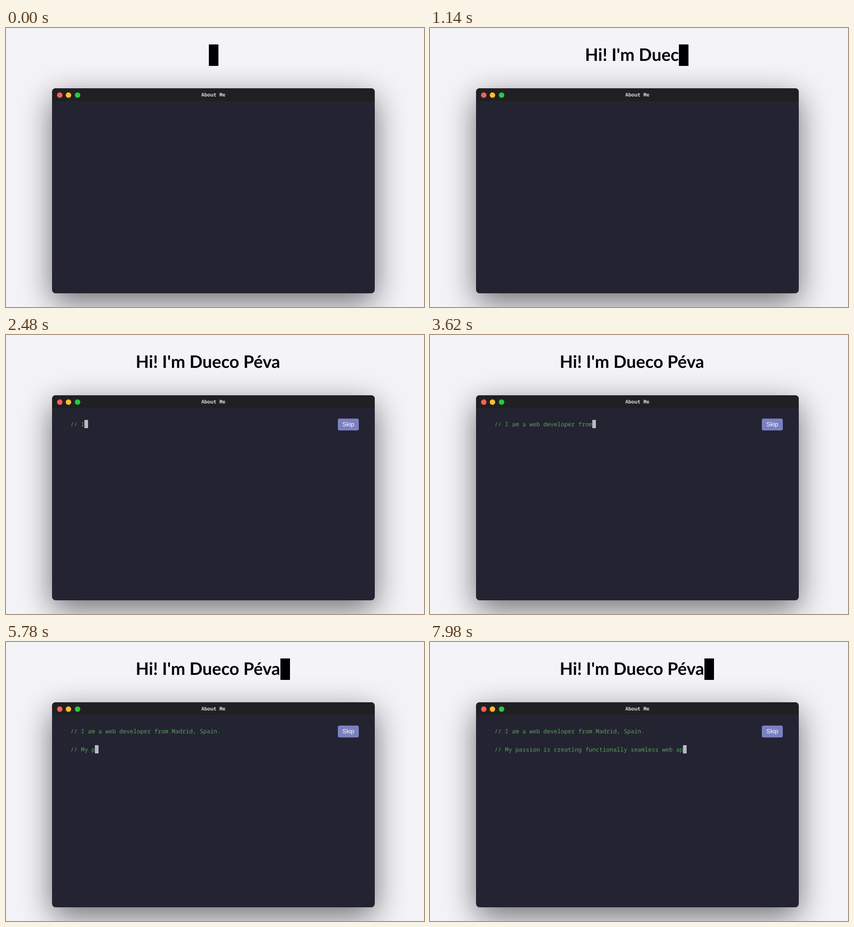
Write an HTML page that moves like this. It is 917 by 611 pixels and loops after 8000 ms.

```html
<!DOCTYPE html>
<html lang="en">
<head>
<meta charset="utf-8">
<title>About Me</title>
<style>
  html, body { margin: 0; width: 100%; height: 100%; overflow: hidden; background: #f4f3f8; }
  body { position: relative; text-rendering: geometricPrecision; }
  .title {
    position: absolute; left: 0; top: 36px; width: 910.5px; height: 47px;
    display: flex; justify-content: center; align-items: flex-start;
    font: 700 37.7px/45px Lato, sans-serif; color: #050507; white-space: pre;
  }
  #name { margin-left: -3px; }
  #name:empty { margin: 0; }
  #nameCaret { width: 21.5px; height: 47px; background: #000; flex: none; }
  .window {
    position: absolute; left: 101px; top: 132px; width: 708px; height: 449px;
    border-radius: 8px; background: #242332;
    box-shadow: 0 20px 68px rgba(0, 0, 0, .55);
  }
  .bar {
    height: 28px; border-radius: 8px 8px 0 0; background: #202023; color: #d6d5da;
    font: 700 11px/29px "Noto Sans Mono", monospace; text-align: center;
  }
  .dot { position: absolute; top: 8.7px; width: 12px; height: 12px; border-radius: 50%; }
  .code {
    position: absolute; left: 40.5px; top: 53px; white-space: pre; color: #5aa05c;
    font: 500 12.78px/20px "Noto Sans Mono", monospace;
  }
  #codeCaret {
    display: inline-block; width: 8px; height: 18px; margin-top: 1px;
    vertical-align: top; background: #bbb9c0;
  }
  #skip {
    position: absolute; left: 627px; top: 51px; width: 46px; height: 26px;
    border-radius: 4px; background: #7b80c0; color: #fff;
    font: 13.33px/25px "Liberation Sans", Arial, sans-serif; text-align: center;
  }
</style>
</head>
<body>
<div class="title"><span id="name"></span><span id="nameCaret"></span></div>
<div class="window">
  <div class="bar">About Me</div>
  <i class="dot" style="left:10.5px;background:#ff5f56"></i>
  <i class="dot" style="left:30.3px;background:#ffbd2e"></i>
  <i class="dot" style="left:50px;background:#27c93f"></i>
  <div class="code"><span id="code"></span><span id="codeCaret"></span></div>
  <div id="skip">Skip</div>
</div>
<script>
const LOOP = 8000, BLINK = 500;
const NAME = "Hi! I'm Dueco Péva";
const CODE = "// I am a web developer from Madrid, Spain.\n\n" +
  "// My passion is creating functionally seamless web ap";

// [time in ms, characters typed]
const NAME_KEYS = [[80, 1], [880, 10], [960, 11], [1160, 13], [1680, 18]];
const CODE_KEYS = [[2290, 0], [4320, 43], [5360, 44], [5780, 52], [5840, 53],
  [6820, 74], [6880, 75], [7820, 95], [7980, 99]];

const el = id => document.getElementById(id);
const show = (id, on) => { el(id).style.visibility = on ? "visible" : "hidden"; };
const write = (id, text) => { if (el(id).textContent !== text) el(id).textContent = text; };

function typed(keys, t) {
  if (t < keys[0][0]) return 0;
  for (let i = 1; i < keys.length; i++) {
    const [t0, n0] = keys[i - 1], [t1, n1] = keys[i];
    if (t < t1) return Math.floor(n0 + (n1 - n0) * (t - t0) / (t1 - t0) + 1e-6);
  }
  return keys[keys.length - 1][1];
}

// Solid while typing, then on and off in turn from the given time
const blink = (t, from) => t < from || Math.floor((t - from) / BLINK) % 2 === 0;

function draw(t) {
  const open = t >= 2220;
  write("name", NAME.slice(0, typed(NAME_KEYS, t)));
  write("code", CODE.slice(0, typed(CODE_KEYS, t)));
  show("nameCaret", blink(t, 1720));
  show("codeCaret", open && (t >= 5360 || blink(t, 4360)));
  show("skip", open);
}

let start;
function tick(now) {
  start ??= now;
  draw((now - start) % LOOP);
  requestAnimationFrame(tick);
}
draw(0);
requestAnimationFrame(tick);
</script>
</body>
</html>
```
